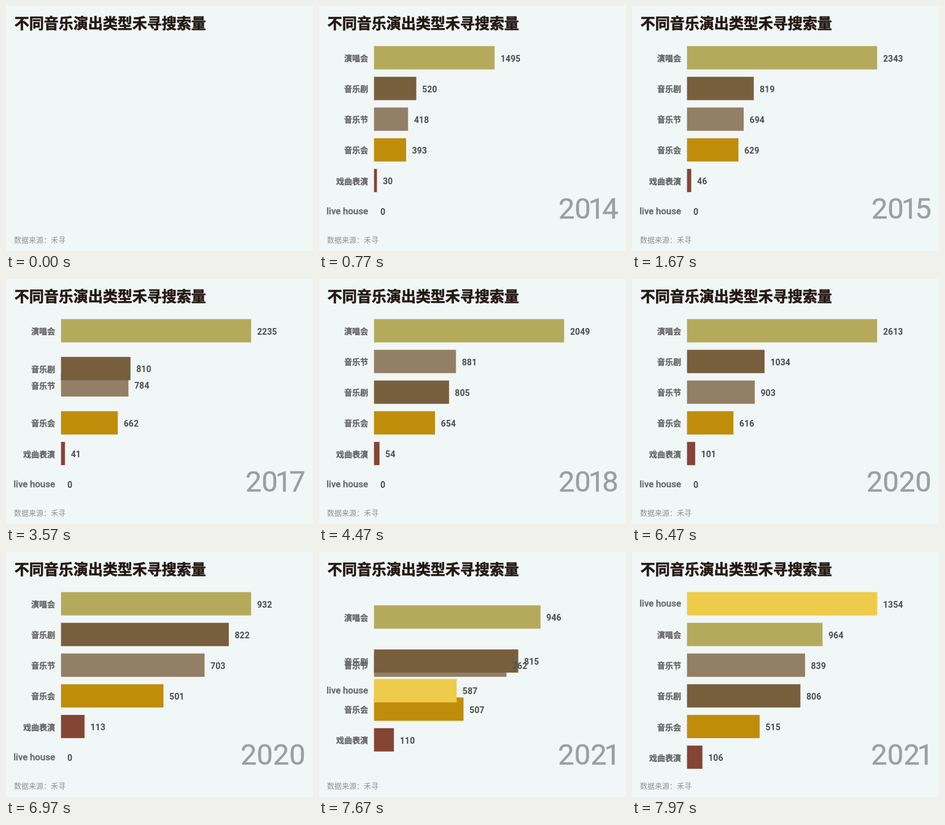
Write an HTML page that moves like this. It is 500 px wide and 400 px high and loops after 8000 ms.

```html
<!DOCTYPE html>
<html lang="zh-CN">
<head>
<meta charset="utf-8">
<style>
  html, body { margin: 0; width: 100%; height: 100%; overflow: hidden; background: #f1f6f7; }
  svg { display: block; width: 500px; height: 400px; }
  text { font-family: "Noto Sans CJK SC", "Noto Sans CJK", sans-serif; }
  .title { font-size: 24px; font-weight: 900; fill: #231815; stroke: #231815; stroke-width: .6px; }
  .note { font-size: 12px; fill: #909090; }
  .name { font-size: 13px; font-weight: 900; fill: #666; stroke: #666; stroke-width: .3px; text-anchor: end; }
  .latin { font: 500 15px Roboto, sans-serif; }
  .value { font: 700 14px Roboto, sans-serif; letter-spacing: .1px; fill: #4d4d4d; }
  .year { font: 400 47px Roboto, sans-serif; fill: #9c9fa1; stroke: #9c9fa1; stroke-width: .4px; text-anchor: end; }
</style>
</head>
<body>
<svg viewBox="0 0 500 400">
  <rect width="500" height="400" fill="#f1f6f7"/>
  <text class="title" x="13.7" y="37.2">不同音乐演出类型禾寻搜索量</text>
  <text class="note" x="13" y="386.5">数据来源：禾寻</text>
  <g id="chart">
    <g id="bars"></g>
    <g id="labels"></g>
    <text class="year" id="year" y="347.3"></text>
  </g>
</svg>
<script>
const LOOP = 8000, START = 470, BEAT = 1000, FIRST_YEAR = 2014;
const LEFT = 90, FULL = 308.9, TOP = 65.9, PITCH = 50.1, BAR_H = 37.2, EDGE = 0.8;

// Yearly values, 2014 to 2021
const series = [
  { name: '演唱会', color: '#b5aa5c', data: [2361, 2320, 2291, 2050, 2034, 2671, 932, 964] },
  { name: '音乐节', color: '#937f65', data: [660, 738, 755, 880, 900, 910, 703, 839] },
  { name: '音乐剧', color: '#775f3d', data: [821, 816, 812, 805, 799, 1041, 822, 806] },
  { name: '音乐会', color: '#bf8d0a', data: [621, 640, 664, 656, 598, 620, 501, 515] },
  { name: '戏曲表演', color: '#854535', data: [48, 43, 37, 53, 77, 101, 113, 106] },
  { name: 'live house', color: '#eecb4a', data: [0, 0, 0, 0, 0, 0, 0, 1354] }
];

const $ = id => document.getElementById(id);

function add(parent, tag, attrs) {
  const el = document.createElementNS('http://www.w3.org/2000/svg', tag);
  for (const k in attrs) el.setAttribute(k, attrs[k]);
  return parent.appendChild(el);
}

for (const s of series) {
  s.latin = /[a-z]/.test(s.name);
  s.bar = add($('bars'), 'rect', {
    x: LEFT, height: BAR_H, fill: s.color, stroke: s.color, 'stroke-width': EDGE
  });
  s.label = add($('labels'), 'text', { class: s.latin ? 'name latin' : 'name', x: 80 });
  s.label.textContent = s.name;
  s.value = add($('labels'), 'text', { class: 'value' });
}

function place(s, year) {
  const all = series.map(o => o.data[year]);
  const v = s.data[year];
  return { v, w: v / Math.max(...all) * FULL, rank: all.filter(o => o > v).length };
}

const mix = (a, b, p) => a + (b - a) * p;

// Tightens the digit 1 on both sides
function setYear(text) {
  const digits = [...text];
  const dx = digits.map((c, i) => i && (c === '1' || digits[i - 1] === '1') ? -4 : 0);
  const el = $('year');
  el.textContent = text;
  el.setAttribute('dx', dx.join(' '));
  el.setAttribute('x', text.endsWith('1') ? 491 : 487.6);
}

function draw(t) {
  const shown = t >= START;
  $('chart').setAttribute('visibility', shown ? 'visible' : 'hidden');
  if (!shown) return;

  const year = Math.floor((t - START) / BEAT);
  const step = Math.floor(((t - START) % BEAT + 5) * 0.03);
  const p = Math.min(1, (step + 0.5) / 15);

  for (const s of series) {
    const to = place(s, year);
    const from = year ? place(s, year - 1) : { v: 0, w: 0, rank: to.rank };
    const w = mix(from.w, to.w, p);
    const y = TOP + PITCH * mix(from.rank, to.rank, p);
    s.bar.setAttribute('y', y);
    s.bar.setAttribute('width', w);
    s.label.setAttribute('y', y + (s.latin ? 23.4 : 24.2));
    s.value.setAttribute('x', LEFT + w + 10);
    s.value.setAttribute('y', y + 24.6);
    s.value.textContent = Math.round(mix(from.v, to.v, p));
  }
  setYear(String(FIRST_YEAR + year));
}

const begin = performance.now();
function tick() {
  draw((performance.now() - begin) % LOOP);
  requestAnimationFrame(tick);
}
draw(0);
requestAnimationFrame(tick);
</script>
</body>
</html>
```
